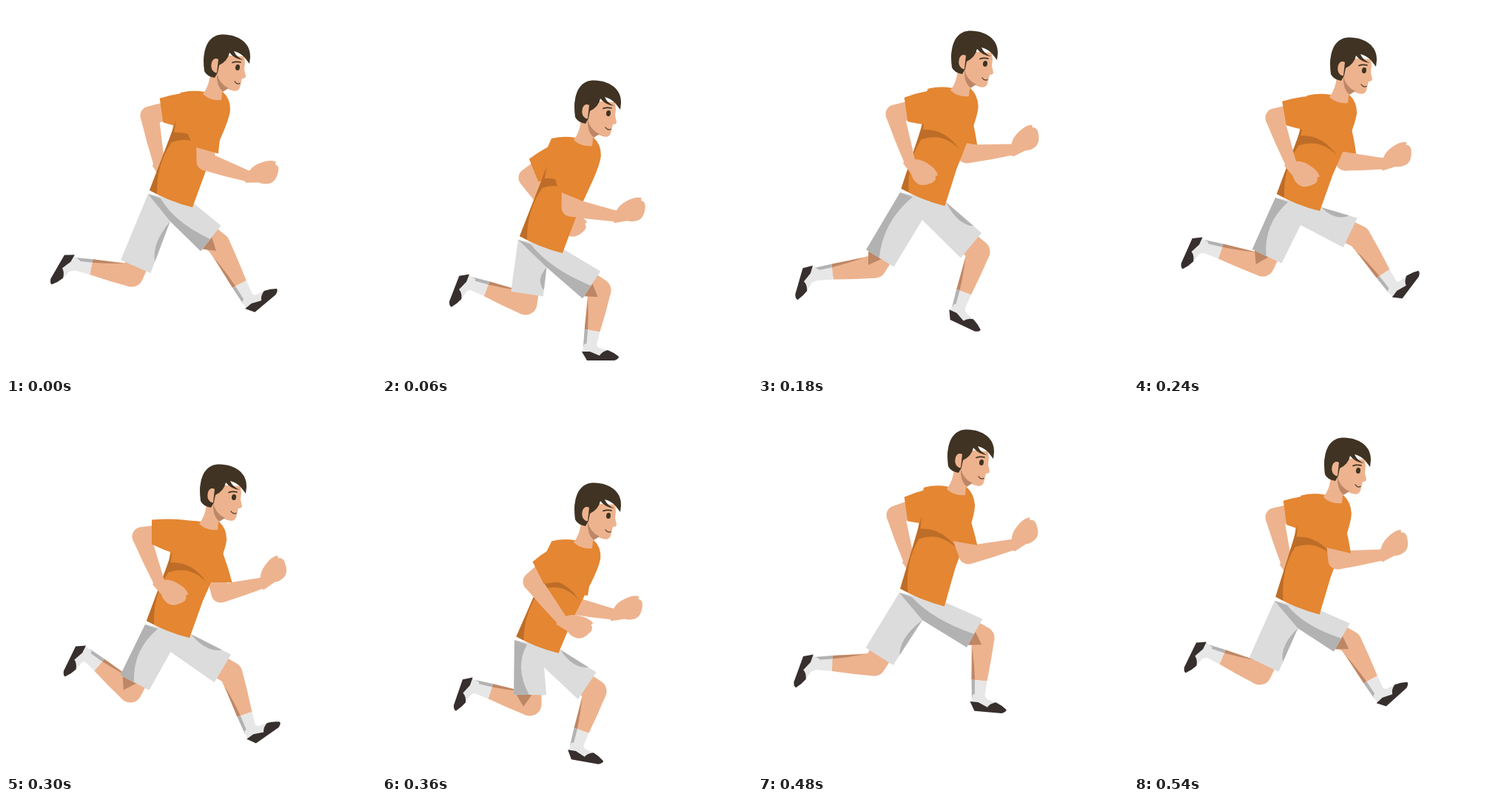
An HTML page with a canvas for the animation above (570 ms loop, 500 by 500 pixels).

```html
<!DOCTYPE html>
<html lang="en">
<head>
<meta charset="utf-8">
<title>Runner</title>
<style>
html, body { margin: 0; width: 100%; height: 100%; overflow: hidden; background: #fff; }
canvas { display: block; width: 500px; height: 500px; }
</style>
</head>
<body>
<canvas id="stage" width="500" height="500"></canvas>
<script>
const ctx = document.getElementById('stage').getContext('2d');
const LOOP = 570, STEP = 30, KEY = 60, RAD = Math.PI / 180;
const C = {
  skin: '#edb38e', skinDark: '#bd8766', shirt: '#e48632', shirtDark: '#bd6d27',
  shorts: '#dcdcdc', shade: '#b2b2b2', sock: '#e7e7e7', shoe: '#372f2d', hair: '#403323'
};

// One row per 60 ms. Body: head shift x, y, hip shift x, y
const body = [
  [0, 0, 0, 0], [-7, 62, -8, 62], [-8, 15, -2, 18], [-6, -5, 0, -2], [-2, 4, -1, 5],
  [-5, 43, -4, 44], [-7, 68, -13, 65], [-8, 10, -1, 15], [-11, -4, -1, 1], [-10, 7, -2, 12]
];
// Legs: knee x, y, ankle x, y, sole angle
const nearLeg = [
  [287, 322, 327, 398, -40], [294, 384, 280, 461, 0], [206, 376, 146, 430, 80],
  [158, 352, 77, 362, 106], [174, 350, 94, 324, 114], [168, 388, 109, 338, 116],
  [200, 406, 125, 381, 109], [280, 350, 207, 372, 76], [304, 316, 297, 397, 5],
  [292, 322, 331, 393, -42]
];
const farLeg = [
  [170, 364, 93, 348, 120], [194, 402, 120, 374, 111], [263, 384, 192, 371, 75],
  [298, 332, 270, 409, 25], [304, 312, 350, 382, -53], [304, 364, 330, 442, -35],
  [288, 388, 262, 463, 10], [218, 382, 160, 442, 42], [157, 352, 77, 350, 110],
  [170, 364, 99, 333, 116]
];
// Arms: sleeve hem x, y, angle, elbow x, y, wrist x, y
const nearArm = [
  [271, 195, 106, 270, 210, 327, 230], [255, 257, 112, 255, 272, 316, 284],
  [208, 176, 149, 197, 188, 226, 246], [200, 140, 172, 185, 146, 205, 210],
  [203, 145, 170, 190, 151, 212, 213], [197, 173, 180, 183, 179, 207, 241],
  [211, 228, 153, 203, 240, 243, 292], [270, 200, 106, 267, 214, 331, 219],
  [280, 188, 100, 284, 204, 345, 190], [277, 198, 103, 275, 211, 335, 204]
];
const farArm = [
  [210, 141, 172, 194, 148, 207, 214], [205, 222, 158, 197, 232, 235, 286],
  [230, 205, 115, 222, 218, 281, 231], [280, 185, 100, 282, 200, 344, 194],
  [284, 197, 100, 285, 210, 337, 213], [289, 241, 90, 290, 256, 346, 242],
  [262, 255, 105, 252, 271, 312, 284], [205, 166, 152, 193, 180, 240, 222],
  [200, 142, 172, 186, 150, 204, 212], [204, 147, 172, 190, 153, 206, 215]
];

// Smooth cyclic interpolation through the rows
function sample(rows, t) {
  const n = rows.length, i = Math.floor(t / KEY), f = (t - i * KEY) / KEY;
  const [a, b, c, d] = [-1, 0, 1, 2].map(k => rows[(i + k + n) % n]);
  return b.map((q, j) => q + f / 2 * (c[j] - a[j] +
    f * (2 * a[j] - 5 * q + 4 * c[j] - d[j] + f * (3 * (q - c[j]) + d[j] - a[j]))));
}

const mix = (p, q, k) => [p[0] + (q[0] - p[0]) * k, p[1] + (q[1] - p[1]) * k];
const add = (p, v, k = 1) => [p[0] + v[0] * k, p[1] + v[1] * k];
const unit = (p, q) => {
  const l = Math.hypot(q[0] - p[0], q[1] - p[1]) || 1;
  return [(q[0] - p[0]) / l, (q[1] - p[1]) / l];
};
const turn = v => [-v[1], v[0]];

// A four-number point is a quadratic curve: control, then end
function poly(color, ...pts) {
  ctx.fillStyle = color;
  ctx.beginPath();
  pts.forEach((p, i) => i === 0 ? ctx.moveTo(...p) :
    p.length === 4 ? ctx.quadraticCurveTo(...p) : ctx.lineTo(...p));
  ctx.closePath();
  ctx.fill();
}
function path(color, d) {
  ctx.fillStyle = color;
  ctx.fill(new Path2D(d));
}
function line(color, width, d) {
  ctx.strokeStyle = color;
  ctx.lineWidth = width;
  ctx.lineCap = 'round';
  ctx.stroke(new Path2D(d));
}
function at([x, y], angle, draw) {
  ctx.save();
  ctx.translate(x, y);
  ctx.rotate(angle);
  draw();
  ctx.restore();
}

function rigLeg(row, hip) {
  const [kx, ky, ax, ay, sole] = row;
  const h = add([214, 264], hip), knee = [kx, ky], dir = unit(h, knee);
  const mid = add(knee, dir, -13), n = turn(dir);
  return {
    knee, ankle: [ax, ay], sole: sole * RAD, dir, mid,
    back: add(mid, n, 22), front: add(mid, n, -22), ahead: mid[0] > h[0] + 8
  };
}

function drawLeg(leg, near, waist) {
  const { knee, ankle, mid, back, front, dir, ahead } = leg;
  const { left, right, crotch } = waist;
  const len = Math.hypot(ankle[0] - knee[0], ankle[1] - knee[1]), cuff = len * .71;
  const top = add(mid, dir, -12);
  line(C.skin, 31, `M${top}L${knee}`);
  at(knee, Math.atan2(ankle[1] - knee[1], ankle[0] - knee[0]), () => {
    poly(C.skin, [0, 15.5], [cuff, 10.5], [cuff, -10.5], [28, -14, 0, -15.5]);
    poly(C.skinDark, [14, 13.5], [cuff, 10.5], [cuff, 6], [34, 9, 14, 13.5]);
    poly(C.sock, [cuff, 10.5], [len, 8], [len + 5, 0], [len, -9], [cuff, -10.5]);
    poly(C.shade, [cuff, 10.5], [len + 1, 8], [len + 1, 4], [cuff, 6]);
  });
  at(ankle, leg.sole, () => {
    poly(C.sock, [-9, 7], [-7, -4], [6, -7], [13, 1], [25, 4], [14, 13], [1, 9]);
    poly(C.shoe, [-10, 6], [1, 6], [14, 11.6], [17, 6, 25, 4], [33, 7, 40, 12.8],
      [40, 16, 34, 18], [-3, 18]);
  });
  if (near) poly(C.skinDark, mix(back, front, .08), mix(back, front, .55),
    add(mix(back, front, .3), dir, 16));

  if (ahead) poly(C.shorts, left, right, front, back, crotch);
  else poly(C.shorts, left, right, crotch, front, back);
  if (near) {
    const edge = ahead ? [back, crotch] : [back];
    poly(C.shade, left, add(left, [17, 6]),
      [...mix(left, back, .5), ...mix(back, front, .47)], ...edge);
  } else {
    const from = ahead ? right : crotch, side = unit(front, back);
    poly(C.shade, from, mix(from, front, .78),
      [...add(mix(from, front, .5), side, 13), ...from]);
  }
}

function drawArm(row, head) {
  const [hx, hy, ha, ex, ey, wx, wy] = row;
  const hem = [hx, hy], elbow = [ex, ey], wrist = [wx, wy];
  const root = add([264, 142], head), s = turn(unit(root, hem));
  const n = [-Math.sin(ha * RAD), Math.cos(ha * RAD)];
  const fore = Math.atan2(wy - ey, wx - ex), len = Math.hypot(wx - ex, wy - ey);
  line(C.skin, 25, `M${mix(root, hem, .8)}L${elbow}`);
  at(elbow, fore, () => poly(C.skin, [0, -12.5], [len, -7.5], [len, 7.5], [len * .5, 11, 0, 12.5]));
  at(wrist, fore - 30 * RAD, () => poly(C.skin, [-6, -4], [4, -7.5], [10, -13, 20, -14.5],
    [34, -17, 41, -12], [39, -9], [44, -6, 42, 0], [36, 15, 26, 15], [18, 15, 13, 11], [-5, 8]));
  const mid = mix(root, hem, .5);
  poly(C.shirt, add(root, s, 25), [...add(mid, s, 26), ...add(hem, n, 16.5)],
    add(hem, n, -16.5), [...add(mid, s, -24), ...add(root, s, -25)]);
}

function drawTorso([hx, hy, px, py]) {
  const kx = (px - hx) / 135, ky = (py - hy) / 135;
  ctx.save();
  ctx.transform(1, 0, kx, 1 + ky, hx - 125 * kx, hy - 125 * ky);
  path(C.shirt, `M236 117Q253 113 268 116L293 116Q303 125 303 140Q302 153 288 183
    L270 223L252 272Q220 264 194 249L222 176Q229 160 226 140Z`);
  path(C.shirtDark, `M230 154L227 171Q256 169 276 198Q254 174 224 184
    Q203 214 204 254L194 249L222 176Z`);
  ctx.restore();
}

function drawHead([x, y]) {
  ctx.save();
  ctx.translate(x, y);
  path(C.skin, 'M276 90Q275 108 266 119Q277 129 291 127L293 108L290 90Z');
  path(C.skin, `M283 66L322 68L323 77L322 86L324 95Q324 98 319 98L316 110
    Q314 116 307 114.500Q291 111 284 92Z`);
  path(C.skinDark, 'M285 91Q288 105 301 111L293 116Q284 108 285 91Z');
  path(C.hair, `M268 88Q266 72 268 64C271 46 281 38 294 38.500C314 39 331 50 330 69
    L329 78L322 69Q316 63 308 61Q311 69 321 73Q309 72 302 63Q300 74 288 80
    L286 90L282 97Q271 95 268 88Z`);
  path(C.skin, 'M287 72Q281 69 278 76Q276 84 280 88Q283 91 285 90Z');
  ctx.fillStyle = C.hair;
  ctx.beginPath();
  ctx.ellipse(313, 83, 3, 4, .15, 0, 7);
  ctx.fill();
  line(C.hair, 1.8, 'M306 76.500Q311 74.500 317 76');
  line(C.hair, 1.2, 'M309 102Q312 106.500 316 104.500');
  ctx.restore();
}

function draw(t) {
  const b = sample(body, t), head = b.slice(0, 2), hip = b.slice(2);
  const near = rigLeg(sample(nearLeg, t), hip), far = rigLeg(sample(farLeg, t), hip);
  const waist = {
    left: add([192, 254], hip),
    right: add([254, 267], hip),
    crotch: [.6 * (219 + hip[0]) + .2 * (near.mid[0] + far.mid[0]), 291 + hip[1]]
  };
  ctx.fillStyle = '#fff';
  ctx.fillRect(0, 0, 500, 500);
  drawArm(sample(farArm, t), head);
  drawLeg(far, false, waist);
  drawLeg(near, true, waist);
  drawTorso(b);
  drawArm(sample(nearArm, t), head);
  drawHead(head);
}

function tick() {
  const t = performance.now() % LOOP;
  draw(Math.floor(t / STEP) * STEP);
  requestAnimationFrame(tick);
}
tick();
</script>
</body>
</html>
```
